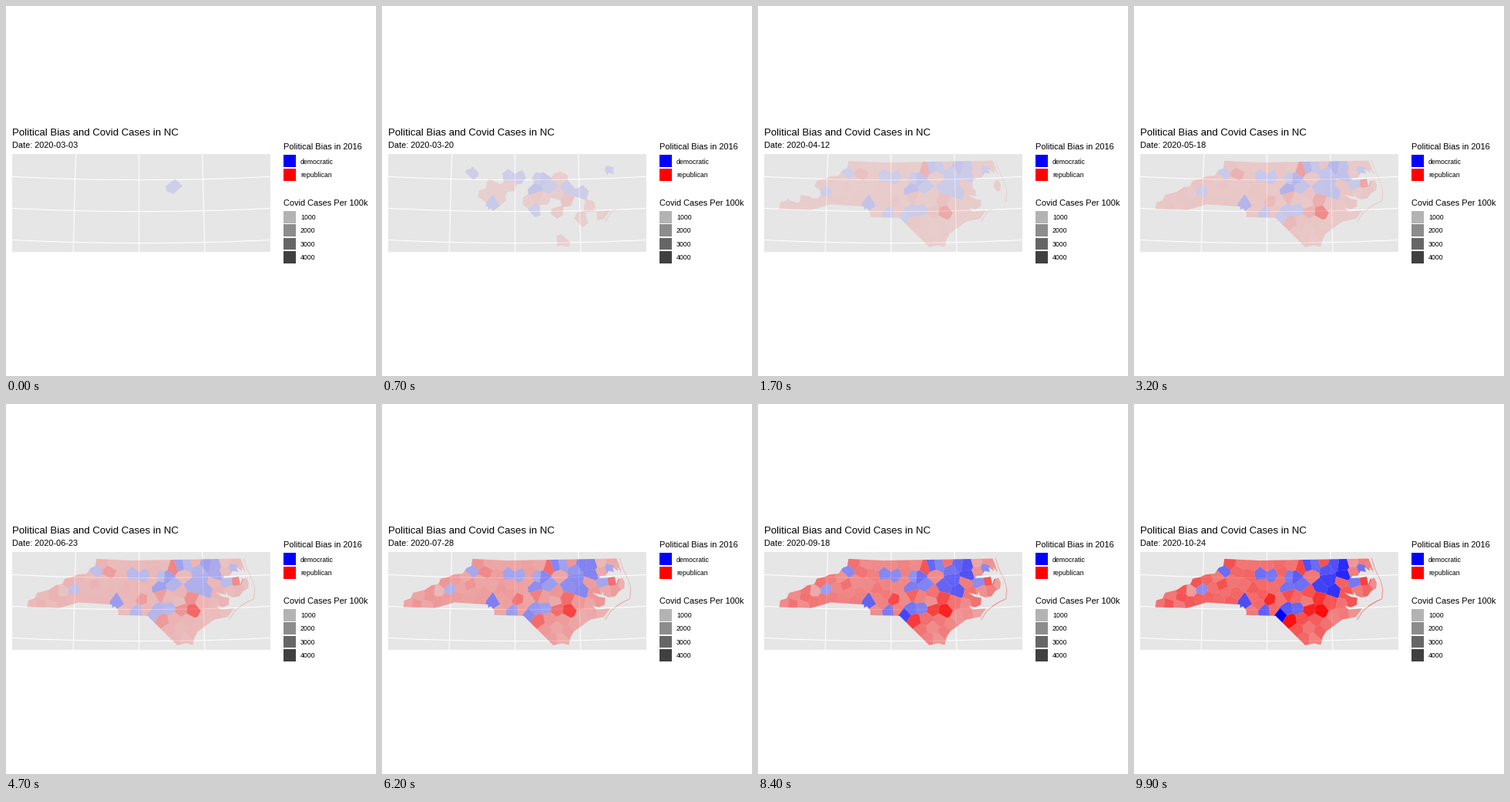
A matplotlib script that plays this animation: 480 by 480 pixels, repeating every 10000 ms.

```python
import random

import numpy as np
import matplotlib.pyplot as plt
from matplotlib.animation import FuncAnimation
from matplotlib.collections import PolyCollection
from matplotlib.patches import Rectangle
from matplotlib.path import Path

FRAMES, LAST_DAY = 100, 235
FIRST_DATE = np.datetime64("2020-03-03")
COUNTY_COUNT = 100
PANEL = (8, 192, 343, 319)
BLUE, RED = (0, 0, 1), (1, 0, 0)
PT = 0.72  # points per pixel at 100 dpi

# county: (degrees west, degrees north, thousand cases per 100k at the end)
DEM = {
    "Watauga": (81.70, 36.23, 2.6), "Buncombe": (82.53, 35.61, 1.7),
    "Mecklenburg": (80.83, 35.25, 3.4), "Forsyth": (80.26, 36.13, 2.5),
    "Guilford": (79.79, 36.08, 2.3), "Anson": (80.10, 34.97, 2.9),
    "Scotland": (79.48, 34.84, 5.4), "Hoke": (79.24, 35.02, 3.1),
    "Cumberland": (78.83, 35.05, 2.7), "Chatham": (79.25, 35.70, 2.4),
    "Orange": (79.12, 36.06, 2.2), "Durham": (78.88, 36.04, 3.0),
    "Wake": (78.65, 35.79, 2.5), "Vance": (78.41, 36.36, 3.3),
    "Warren": (78.11, 36.40, 2.6), "Halifax": (77.65, 36.26, 3.2),
    "Northampton": (77.40, 36.42, 3.3), "Hertford": (77.00, 36.36, 4.3),
    "Bertie": (76.97, 36.06, 4.4), "Edgecombe": (77.60, 35.91, 3.8),
    "Wilson": (77.92, 35.70, 3.7), "Pitt": (77.37, 35.59, 4.1),
    "Pasquotank": (76.27, 36.27, 2.4), "Washington": (76.57, 35.84, 2.3),
}
REP = {
    "Haywood": (82.98, 35.56, 1.3), "Wilkes": (81.16, 36.21, 2.7),
    "Lincoln": (81.22, 35.49, 2.7), "Iredell": (80.87, 35.81, 2.4),
    "Rowan": (80.52, 35.64, 3.0), "Cabarrus": (80.55, 35.39, 2.6),
    "Davidson": (80.21, 35.79, 2.6), "Montgomery": (79.90, 35.33, 4.4),
    "Moore": (79.48, 35.31, 2.4), "Lee": (79.17, 35.47, 3.4),
    "Robeson": (79.10, 34.64, 5.0), "Harnett": (78.87, 35.37, 2.7),
    "Granville": (78.65, 36.30, 3.6), "Franklin": (78.29, 36.08, 2.3),
    "Johnston": (78.37, 35.52, 3.2), "Sampson": (78.37, 34.99, 4.6),
    "Brunswick": (78.23, 34.07, 2.0), "Duplin": (77.93, 34.94, 5.1),
    "Wayne": (78.00, 35.36, 4.1), "Onslow": (77.43, 34.73, 2.0),
    "Craven": (77.08, 35.12, 2.4), "Carteret": (76.65, 34.82, 1.6),
    "Tyrrell": (76.17, 35.87, 3.7), "Dare": (75.77, 35.75, 1.7),
}
COUNTIES = {**DEM, **REP}

FIRST = """Watauga Pasquotank Forsyth Guilford Orange Durham Chatham Hoke
Mecklenburg Wilson Pitt Iredell Lincoln Cabarrus Davidson Rowan Moore Lee
Harnett Johnston Sampson Wayne Franklin Craven Onslow Carteret Brunswick""".split()

# growth exponent: below 1 rises early, above 1 rises late
PACE = {
    "Duplin": 0.42, "Sampson": 0.75, "Wayne": 0.6, "Tyrrell": 0.5,
    "Chatham": 0.45, "Mecklenburg": 0.62, "Durham": 0.6, "Lee": 0.65,
    "Granville": 0.42, "Montgomery": 0.8, "Wilkes": 0.5, "Vance": 0.7,
    "Robeson": 0.85, "Northampton": 0.65, "Wake": 0.85, "Scotland": 1.4,
    "Watauga": 1.2,
}

COAST = [
    (76.0, 36.55), (75.95, 36.45), (75.82, 36.1), (75.98, 36.28),
    (75.97, 36.15), (76.18, 36.29), (76.12, 36.13), (76.33, 36.17),
    (76.45, 36.02), (76.65, 36.02), (76.72, 35.95), (76.4, 35.95),
    (76.1, 35.98), (76.05, 35.72), (75.97, 35.9), (75.8, 35.93),
    (75.72, 35.78), (75.75, 35.6), (75.95, 35.52), (76.1, 35.36),
    (76.35, 35.33), (76.55, 35.4), (76.6, 35.52), (76.63, 35.42),
    (77.0, 35.5), (76.75, 35.36), (76.5, 35.32), (76.53, 35.1),
    (76.75, 35.03), (77.0, 35.08), (76.85, 34.96), (76.33, 34.98),
    (76.57, 34.72), (77.1, 34.65), (77.4, 34.48), (77.75, 34.28),
    (77.88, 34.1), (77.95, 33.86), (78.2, 33.92), (78.54, 33.86),
]
BORDER = [
    (79.67, 34.8), (80.8, 34.82), (80.79, 34.95), (80.93, 35.1),
    (81.04, 35.05), (81.04, 35.15), (82.35, 35.2), (82.6, 35.13),
    (83.11, 35.0), (84.32, 34.99), (84.29, 35.21), (84.05, 35.28),
    (83.96, 35.46), (83.5, 35.57), (83.25, 35.72), (82.99, 35.77),
    (82.9, 35.94), (82.6, 36.0), (82.41, 36.08), (82.05, 36.12),
    (81.9, 36.3), (81.72, 36.36), (81.68, 36.59), (80.3, 36.55),
]
BANKS = [
    (75.87, 36.55), (75.75, 36.2), (75.56, 35.85), (75.48, 35.57),
    (75.53, 35.25), (75.75, 35.18), (76.0, 35.07), (76.3, 34.88),
    (76.52, 34.62),
]


def project(west, north):
    """Conic projection from degrees to stage pixels."""
    scale, mid = 41.0, np.radians(35.3)
    apex = np.degrees(1 / np.tan(mid)) + 35.3
    theta = np.sin(mid) * np.radians(79.9 - np.asarray(west, float))
    rho = scale * (apex - np.asarray(north, float))
    top = 225.6 - scale * (apex - 36)
    return np.column_stack([175.9 + rho * np.sin(theta), top + rho * np.cos(theta)])


def closed(points):
    pts = project(*zip(*points))
    return Path(np.vstack([pts, pts[:1]]), closed=True)


def distances(points, seeds):
    return np.hypot(*(points[:, None] - seeds[None]).transpose(2, 0, 1))


def fill(seeds, area, count):
    """Add seeds in the widest gaps, then even out the added ones."""
    fixed = len(seeds)
    x0, y0, x1, y1 = PANEL
    grid = np.array([(x, y) for x in range(x0, x1, 2) for y in range(y0, y1, 2)], float)
    grid = grid[area.contains_points(grid)]
    while len(seeds) < count:
        gap = distances(grid, seeds).min(axis=1)
        seeds = np.vstack([seeds, grid[gap.argmax()]])
    for _ in range(25):
        owner = distances(grid, seeds).argmin(axis=1)
        for i in range(fixed, count):
            if np.any(owner == i):
                seeds[i] = grid[owner == i].mean(axis=0)
    return seeds


def nearer(poly, a, b):
    """Part of a polygon lying closer to a than to b."""
    normal, mid = b - a, (a + b) / 2
    side = [float(np.dot(p - mid, normal)) for p in poly]
    out = []
    for i, p in enumerate(poly):
        q, s, t = poly[i - 1], side[i], side[i - 1]
        if (s > 0) != (t > 0):
            out.append(q + (p - q) * t / (t - s))
        if s <= 0:
            out.append(p)
    return out


def cells(seeds):
    x0, y0, x1, y1 = PANEL
    frame = [np.array(p, float) for p in ((x0, y0), (x1, y0), (x1, y1), (x0, y1))]
    result = []
    for a in seeds:
        poly = frame
        order = np.argsort(np.hypot(*(seeds - a).T))
        for j in order[1:30]:
            poly = nearer(poly, a, seeds[j])
        result.append(np.array(poly))
    return result


def first_day(name, x, y):
    if name == "Wake":
        return 0
    if name in FIRST:
        return rng.uniform(2, 16)
    if name == "Dare":
        return 30
    mountains = 36 < x < 75 and y < 250
    sound = 285 < x < 306 and 225 < y < 255
    if mountains or sound:
        return rng.uniform(42, 72)
    return rng.uniform(18, 26 if x < 45 else 38)


def final_rate(name, x, y):
    if name in COUNTIES:
        return COUNTIES[name][2]
    northeast = x > 268 and y < 224
    return rng.uniform(2.1, 3.4) * (0.65 if northeast else 1)


rng = random.Random(4)
mainland = closed(COAST + BORDER)
known = np.array(list(COUNTIES.values()))
seeds = fill(project(known[:, 0], known[:, 1]), mainland, COUNTY_COUNT)
names = list(COUNTIES) + [""] * (COUNTY_COUNT - len(COUNTIES))
final = np.array([final_rate(n, *p) for n, p in zip(names, seeds)])
start = np.array([first_day(n, *p) for n, p in zip(names, seeds)])
pace = np.array([PACE.get(n, 1) for n in names])
colors = np.array([(*(BLUE if n in DEM else RED), 0.0) for n in names])

plt.rcParams["font.family"] = "Liberation Sans"
fig = plt.figure(figsize=(4.8, 4.8), dpi=100, facecolor="white")
ax = fig.add_axes([0, 0, 1, 1])
ax.set(xlim=(0, 480), ylim=(480, 0))
ax.axis("off")


def label(x, y, text, size):
    return ax.text(x, y, text, fontsize=size * PT, color="black", va="baseline")


def box(x, y, w, h, color):
    return ax.add_patch(Rectangle((x, y), w, h, facecolor=color, linewidth=0))


def legend(title, y, entries):
    label(359.5, y, title, 11)
    for i, (text, color) in enumerate(entries):
        top = y + 6.7 + 17.28 * i
        box(360.1, top + 0.7, 15.9, 15.9, color)
        label(382, top + 11.9, text, 8.8)


x0, y0, x1, y1 = PANEL
panel = box(x0, y0, x1 - x0, y1 - y0, "#e6e6e6")
span = np.linspace(0, 1, 60)
meridians = [project(np.full(60, w), 33 + 5 * span) for w in (82.5, 80, 77.5)]
parallels = [project(74 + 12 * span, np.full(60, n)) for n in (34, 35, 36)]
for pts in meridians + parallels:
    line, = ax.plot(*pts.T, color="white", lw=1.1 * PT)
    line.set_clip_path(panel)

inner = [(w + 0.03, n + 0.015) for w, n in reversed(BANKS)]
land = Path.make_compound_path(mainland, closed(BANKS + inner))
counties = PolyCollection(cells(seeds), linewidths=0, zorder=3)
ax.add_collection(counties, autolim=False)
counties.set_clip_path(land, ax.transData)

label(8, 168, "Political Bias and Covid Cases in NC", 13.2)
subtitle = label(8, 184, "", 11)
legend("Political Bias in 2016", 186, [("democratic", BLUE), ("republican", RED)])
legend("Covid Cases Per 100k", 258.6,
       [("1000", "#b3b3b3"), ("2000", "#8c8c8c"),
        ("3000", "#666666"), ("4000", "#404040")])


def update(frame):
    day = LAST_DAY * frame / (FRAMES - 1)
    growth = np.interp(day, [0, 40, 76, 109, 147, 199, 235],
                       [0, 0.018, 0.075, 0.2, 0.455, 0.745, 1])
    alpha = 0.1 + 0.9 * final * growth ** pace / final.max()
    colors[:, 3] = np.where(day >= start, alpha, 0)
    counties.set_facecolor(colors)
    subtitle.set_text(f"Date: {FIRST_DATE + round(day)}")
    return counties, subtitle


anim = FuncAnimation(fig, update, frames=FRAMES, interval=100,
                     repeat=True, repeat_delay=0)
plt.show()
```
